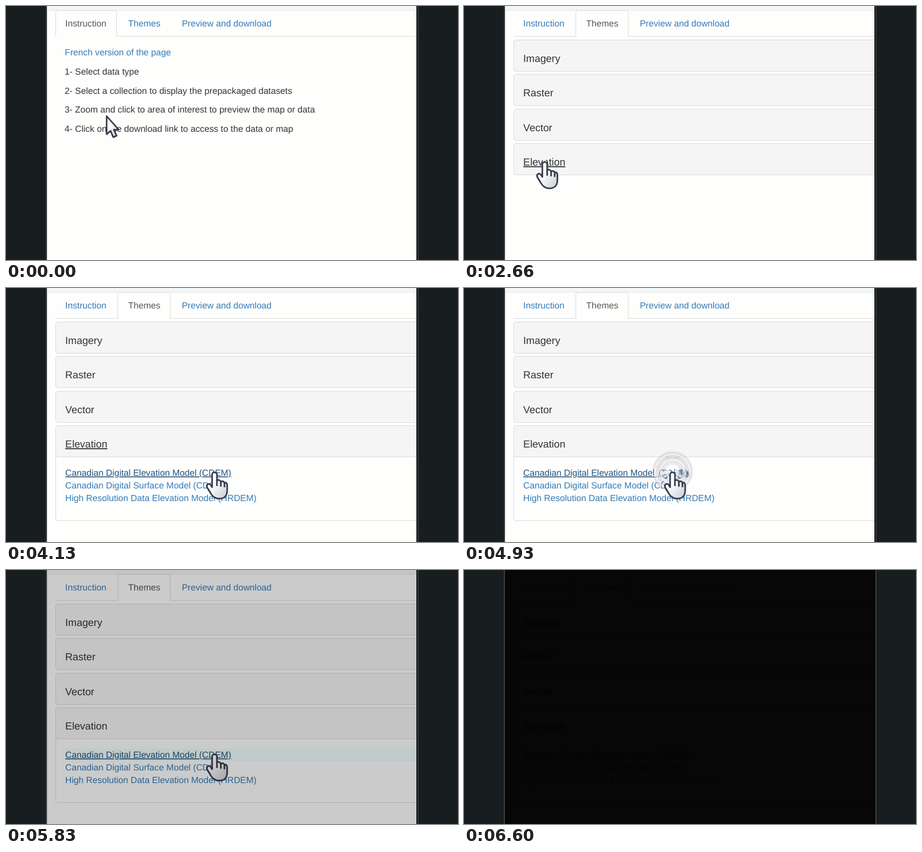
Write an HTML page that moves like this. It is 750 by 422 pixels and loops after 6630 ms.

```html
<!DOCTYPE html>
<html lang="en">
<head>
<meta charset="utf-8">
<title>Data download guide</title>
<style>
  html, body { margin: 0; width: 100%; height: 100%; overflow: hidden; background: #181d20; }
  svg { display: block; width: 100vw; height: 100vh; }
  text { font: 14.8px "Liberation Sans", Arial, sans-serif; fill: #333; text-rendering: geometricPrecision; }
  text.title { font-size: 17px; }
  text.link { fill: #337ab7; }
  text.link.hover { fill: #23527c; }
  text.hover { text-decoration: underline; }
  text.active { fill: #555; }
  .box { stroke: #ddd; }
  .tab { fill: none; stroke: none; }
  .tab.over { fill: #eee; stroke: #eee; }
  .tab.active { fill: #fefefd; stroke: #ddd; }
  .cursor { stroke: #34394a; stroke-width: 2.6; stroke-linejoin: round; stroke-linecap: round; }
</style>
</head>
<body>
<svg viewBox="0 0 750 422" preserveAspectRatio="none">
  <defs>
    <clipPath id="window"><rect x="68" width="613" height="422"/></clipPath>
    <clipPath id="fold"><rect id="foldRect" x="68" y="281" width="613" height="0"/></clipPath>
    <linearGradient id="metal" x2="1" y2="1">
      <stop offset=".35" stop-color="#fff"/><stop offset="1" stop-color="#c9ccd4"/>
    </linearGradient>
    <radialGradient id="shade">
      <stop offset="0" stop-color="#fff" stop-opacity="0"/>
      <stop offset=".3" stop-color="#fff" stop-opacity=".4"/>
      <stop offset=".44" stop-color="#667" stop-opacity=".1"/>
      <stop offset=".56" stop-color="#fff" stop-opacity=".6"/>
      <stop offset=".7" stop-color="#667" stop-opacity=".13"/>
      <stop offset=".82" stop-color="#fff" stop-opacity=".6"/>
      <stop offset=".93" stop-color="#667" stop-opacity=".12"/>
      <stop offset="1" stop-color="#667" stop-opacity="0"/>
    </radialGradient>
  </defs>
  <rect width="750" height="422" fill="#181d20"/>
  <g clip-path="url(#window)">
    <g id="page">
      <rect x="60" width="640" height="422" fill="#f4f5f7"/>
      <path d="M68 430V12Q68 7 73 7H700V430Z" fill="#fefefd" stroke="#e6e6e6"/>
      <path d="M82 50.5H700" class="box"/>
      <g id="tabs"></g>
      <g id="intro"></g>
      <g id="themes"></g>
    </g>
    <g id="ripple"></g>
    <g id="pointer">
      <path id="arrow" class="cursor" fill="url(#metal)" d="M1 1V31L7.500 25.500L12 36L17.500 33.500L13 23.500H21Z"/>
      <g id="hand" class="cursor" fill="url(#metal)">
        <path d="M-4 5C-4 0 4 0 4 5V15C6 13 10 14 10.500 17C13 15 16 16.500 16.500 19C19 17.500 21 19 21 23V31C21 39 17 45 8 45C0 45 -4 41 -7 35L-12.500 26C-14 21 -9 19 -6.500 22L-4 26Z"/>
        <path d="M4 15V23M10.500 17V24M16.500 19V25" fill="none"/>
      </g>
    </g>
    <rect id="dark" x="60" width="640" height="422"/>
  </g>
  <rect x="681" width="2" height="422" fill="#08090a"/>
  <path d="M67 0V422M683.500 0V422" stroke="#5a5c5d"/>
</svg>
<script>
const LOOP = 6630, RINGS = 24;
const $ = id => document.getElementById(id);
const clamp = v => Math.max(0, Math.min(1, v));
const smooth = v => v * v * (3 - 2 * v);

function add(parent, tag, attrs, content) {
  const el = document.createElementNS('http://www.w3.org/2000/svg', tag);
  for (const k in attrs) el.setAttribute(k, attrs[k]);
  if (content) el.textContent = content;
  parent.appendChild(el);
  return el;
}
const label = (parent, x, y, str, cls = '') => add(parent, 'text', { x, y, class: cls }, str);

// Tabs
const tabs = [['Instruction', 98.3, 82.5, 183.5], ['Themes', 202.7, 185.5, 272.5],
  ['Preview and download', 291.7, 274.5, 458.5]].map(([name, x, l, r]) => ({
  l, r,
  box: add($('tabs'), 'path', { class: 'tab', d: `M${l} 51V11Q${l} 7.500 ${l + 4} 7.500H${r - 4}Q${r} 7.500 ${r} 11V51` }),
  text: label($('tabs'), x, 34, name, 'link')
}));

// Instruction page
const french = label($('intro'), 97.6, 82, 'French version of the page', 'link');
['Select data type', 'Select a collection to display the prepackaged datasets',
  'Zoom and click to area of interest to preview the map or data',
  'Click on the download link to access to the data or map'
].forEach((s, i) => label($('intro'), 97.3, 113.7 + i * 31.8, `${i + 1}- ${s}`));

// Themes page
const body = add($('themes'), 'g', { 'clip-path': 'url(#fold)' });
const bodyBox = add($('themes'), 'path', { class: 'box', fill: 'none' });
const focusRow = add(body, 'rect', { x: 98, y: 297, width: 600, height: 21, fill: '#effcfc' });
const links = ['Canadian Digital Elevation Model (CDEM)', 'Canadian Digital Surface Model (CDSM)',
  'High Resolution Data Elevation Model (HRDEM)'
].map((s, i) => label(body, 98.3, 312 + i * 21.1, s, 'link'));
const titles = ['Imagery', 'Raster', 'Vector', 'Elevation'].map((s, i) => {
  const y = 56.5 + Math.round(i * 57.4);
  add($('themes'), 'rect', { class: 'box', x: 82.5, y, width: 640, height: 52, rx: 3.5, fill: '#f5f5f6' });
  return label($('themes'), 98.3, y + 36.7, s, 'title');
});

// Concentric discs of the page, each scaled a little, bend it like a wave
const rings = Array.from({ length: RINGS }, (_, i) => {
  const clip = add(document.querySelector('defs'), 'clipPath', { id: 'ring' + i });
  const circle = add(clip, 'circle', {});
  const g = add($('ripple'), 'g', { 'clip-path': `url(#ring${i})` });
  return { circle, copy: add(g, 'use', { href: '#page' }) };
});
const shade = add($('ripple'), 'circle', { fill: 'url(#shade)' });

const clicks = [[1100, 203, 33], [2660, 134, 258], [4430, 346, 305]];
const path = [[330, 166, 182], [630, 203, 33], [1800, 203, 33], [2270, 136, 269], [2430, 134, 258],
  [3330, 134, 258], [3960, 315, 303], [4130, 346, 305]];

function cursorAt(t) {
  if (t <= path[0][0]) return path[0].slice(1);
  const i = path.findIndex(p => p[0] > t);
  if (i < 0) return path[path.length - 1].slice(1);
  const [t0, x0, y0] = path[i - 1], [t1, x1, y1] = path[i];
  const k = smooth((t - t0) / (t1 - t0));
  return [x0 + (x1 - x0) * k, y0 + (y1 - y0) * k];
}

function drawRipple(t) {
  const click = clicks.find(c => t > c[0] && t < c[0] + 1220);
  $('ripple').style.display = click ? '' : 'none';
  if (!click) return;
  const [start, x, y] = click, age = t - start;
  const R = 2 + age * 0.0635;
  const power = clamp(age / 150) * clamp((1220 - age) / 200);
  rings.forEach(({ circle, copy }, i) => {
    const q = (RINGS - i) / RINGS, rho = (q - 0.5 / RINGS) * R;
    const shift = power * Math.min(4.5, R * 0.1) * Math.sin(q * Math.PI * 5) * Math.sin(q * Math.PI);
    const s = rho / Math.max(rho - shift, rho * 0.6);
    circle.setAttribute('cx', x);
    circle.setAttribute('cy', y);
    circle.setAttribute('r', q * R);
    copy.setAttribute('transform', `translate(${x} ${y}) scale(${s}) translate(${-x} ${-y})`);
  });
  shade.setAttribute('cx', x);
  shade.setAttribute('cy', y);
  shade.setAttribute('r', R * 1.04);
  shade.setAttribute('opacity', power);
}

function draw(t) {
  const [x, y] = cursorAt(t);
  const current = t < 1200 ? 0 : 1;
  const inside = (l, top, r, bottom) => x > l && x < r && y > top && y < bottom;

  let link = false;
  tabs.forEach((tab, i) => {
    const over = inside(tab.l, 7, tab.r, 50), active = i === current;
    link = link || over;
    tab.box.setAttribute('class', 'tab' + (active ? ' active' : over ? ' over' : ''));
    tab.text.setAttribute('class', active ? 'active' : 'link');
  });

  const overFrench = !current && inside(97, 68, 274, 88);
  const overTitle = current && inside(98, 249, 168, 272);
  const overModel = current && t > 3330 && inside(98, 297, 375, 317);
  link = link || overFrench || overTitle || overModel;
  french.setAttribute('class', overFrench ? 'link hover' : 'link');
  titles[3].setAttribute('class', overTitle || (t > 2660 && t < 4500) ? 'title hover' : 'title');
  links[0].setAttribute('class', overModel ? 'link hover' : 'link');
  focusRow.style.display = t > 5100 ? '' : 'none';
  $('intro').style.display = current ? 'none' : '';
  $('themes').style.display = current ? '' : 'none';

  const open = smooth(clamp((t - 2780) / 350)) * 106;
  $('foldRect').setAttribute('height', open);
  bodyBox.setAttribute('d', open ? `M82.500 278V${277.5 + open}Q82.500 ${280.5 + open} 86 ${280.5 + open}H700` : '');

  drawRipple(t);
  $('pointer').setAttribute('transform', `translate(${x} ${y})`);
  $('pointer').setAttribute('opacity', clamp((6560 - t) / 200));
  $('hand').style.display = link ? '' : 'none';
  $('arrow').style.display = link ? 'none' : '';
  $('dark').setAttribute('opacity', clamp((t - 5630) / 1000));
}

const begin = performance.now();
function tick() {
  draw((performance.now() - begin) % LOOP);
  requestAnimationFrame(tick);
}
tick();
</script>
</body>
</html>
```
